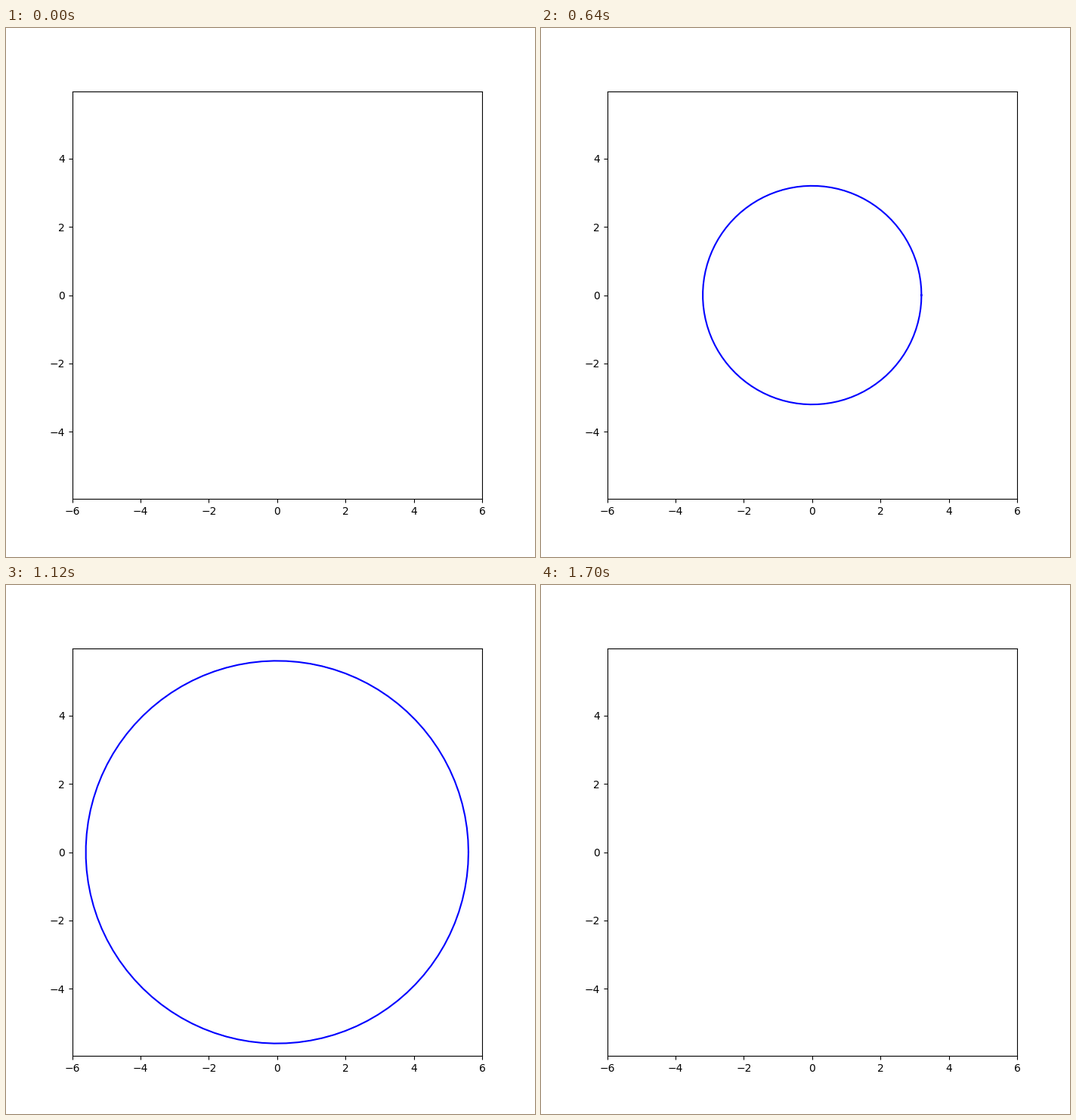
Write a matplotlib script that moves like this. It is 700 px wide and 700 px high and loops after 1.84 s.

```python
import numpy as np
import matplotlib.pyplot as plt
from matplotlib.animation import FuncAnimation

FRAMES = 92
INTERVAL = 20   # ms
GROWTH = 0.1    # radius gained per frame
HALF = 6

plt.rcParams["font.family"] = "DejaVu Sans"

fig, ax = plt.subplots(figsize=(7, 7), dpi=100)

# Equal scale on both axes: the box is slightly wider than tall
box = ax.get_position()
half_y = HALF * box.height / box.width
ax.set_xlim(-HALF, HALF)
ax.set_ylim(-half_y, half_y)
ax.set_xticks(range(-6, 7, 2))
ax.set_yticks(range(-4, 5, 2))

theta = np.linspace(0, 2 * np.pi, 100)
ring, = ax.plot([], [], color="blue", lw=1.5)


def update(i):
    r = GROWTH * i
    ring.set_data(r * np.cos(theta), r * np.sin(theta))
    ring.set_visible(0 < r < np.hypot(HALF, half_y))
    return ring,


anim = FuncAnimation(fig, update, frames=FRAMES, interval=INTERVAL,
                     repeat=True, repeat_delay=0)
plt.show()
```
